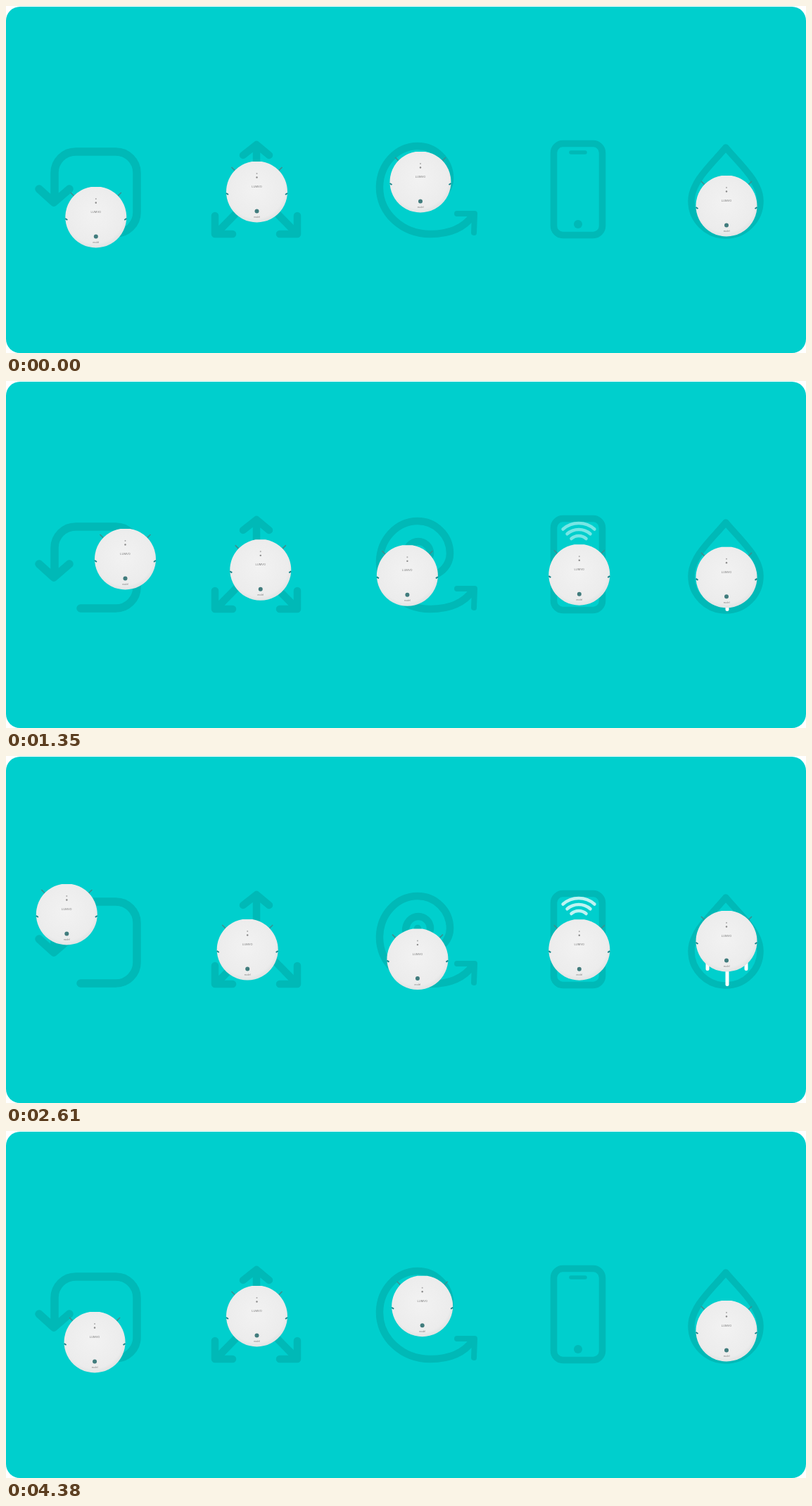
An HTML page that plays this animation: 1137x493 px, repeating every 4.41 s.

```html
<!DOCTYPE html>
<html lang="en">
<head>
<meta charset="utf-8">
<title>Robot cleaner features</title>
<style>
  html, body { margin: 0; width: 100%; height: 100%; overflow: hidden; background: #fff; }
  svg { display: block; width: 100%; height: 100%; }
  .icons { fill: none; stroke: #00b9b7; stroke-width: 10.5; stroke-linecap: round; stroke-linejoin: round; }
  .white { fill: none; stroke: #fff; stroke-linecap: round; }
  text { font-family: Inter, Arial, sans-serif; text-anchor: middle; fill: #777; }
</style>
</head>
<body>
<svg viewBox="0 0 1137 493">
  <defs>
    <radialGradient id="shell" cx=".48" cy=".45" r=".56">
      <stop offset="0" stop-color="#f2f2f2"/>
      <stop offset=".85" stop-color="#ececec"/>
      <stop offset="1" stop-color="#dfe2e2"/>
    </radialGradient>
    <g id="bot">
      <path d="M-36-35l5 5M36-35l-5 5" stroke="#3b8f91" stroke-width="1.6"/>
      <path d="M-7-43H7A43.5 43.5 0 1 1-7-43Z" fill="url(#shell)"/>
      <path d="M-43.5 2l3 2M43.5 2l-3 2" stroke="#16858a" stroke-width="2"/>
      <circle cy="-26" r="1" fill="#aaa"/>
      <circle cy="-20.5" r="1.2" fill="#888"/>
      <text y="-6" font-size="4">LUMVO</text>
      <circle cy="27.5" r="3" fill="#417c7d"/>
      <text y="37" font-size="3">model</text>
    </g>
    <path id="out" d="M589 250C616 240 610 211 576 214C556 215 550 262 570 276C584 288 612 290 638 277"/>
    <path id="back" d="M638 277C618 290 600 294 586 289C552 277 535 215 576 208.5C612 202 614 240 589 250"/>
  </defs>

  <rect y="1" width="1137" height="492" rx="20" fill="#00cfcd"/>

  <g class="icons">
    <path stroke-width="11.5" d="M106 323H156A30 30 0 0 0 186 293V237A30 30 0 0 0 156 207H99A30 30 0 0 0 69 237V277M47 260L68 279L90 260"/>
    <path d="M356 198V265L298 324M356 265L414 324M337 212L356 197L374 212M297 298V324H322M389 324H414V298"/>
    <path d="M664 297Q645 324 603 324A72 66 0 0 1 531 258A54 59 0 0 1 585 199A46 46 0 0 1 631 245A35 33 0 0 1 596 278A28 30 0 0 1 568 248A18 20 0 0 1 586 228A17 17 0 0 1 603 245A9 9 0 0 1 585 245"/>
    <path stroke-width="8" d="M641 295H666L665 322"/>
    <rect stroke-width="9.5" x="778.5" y="195.5" width="69" height="130" rx="13"/>
    <path id="slot" stroke-width="5.5" d="M803 208H823"/>
    <path stroke-width="12" d="M813 310h0"/>
    <path stroke-width="9.5" d="M1023 201C1004 224 974 249 974 277A49 49 0 0 0 1072 277C1072 249 1042 224 1023 201Z"/>
    <path stroke-width="8" d="M1002 278A22 22 0 0 0 1046 278"/>
  </g>

  <g id="wifi" class="white" stroke-width="4.5"></g>
  <path id="water" class="white" stroke-width="5"/>
  <g id="bots"></g>
</svg>

<script>
const LOOP = 4410, STEP = 30, TURN = 2035;
const $ = id => document.getElementById(id);
const mix = (a, b, u) => a + (b - a) * u;
const ramp = (t, from, to) => Math.min(1, Math.max(0, (t - from) / (to - from)));
const pulse = (t, a, b, c, d) => ramp(t, a, b) * (1 - ramp(t, c, d));

// Index of the interval holding t, and how far through it t is
function locate(times, t) {
  const i = times.findIndex((v, k) => t < times[k + 1]);
  return i < 0 ? [times.length - 2, 1] : [i, ramp(t, times[i], times[i + 1])];
}

// Out and back at an even pace within each interval: 0, 1, 0
function trip(times, t) {
  const [i, u] = locate(times, t);
  return [i, 1 - Math.abs(2 * u - 1)];
}

// Start point on the lower side, four corners, start point again
const sideTimes = [0, 720, 1725, 2640, 3660, LOOP];
const sideX = [127.8, 169.5, 169.5, 83.5, 84.2, 127.8];
const sideY = [300, 300, 225, 225, 300, 300];

function square(t) {
  const [i, u] = locate(sideTimes, t);
  return [sideX, sideY].map(v => mix(v[i], v[i + 1], u));
}

const arms = [[35, 29], [-35, 29], [0, -25]];

function fork(t) {
  const [i, u] = trip([0, 1460, 2880, LOOP], t);
  return [356.5 + arms[i][0] * u, 264 + arms[i][1] * u];
}

function spiral(t) {
  const path = $(t < TURN ? 'out' : 'back');
  const u = t < TURN ? t / TURN : ramp(t, TURN, LOOP);
  const p = path.getPointAtLength(u * path.getTotalLength());
  return [p.x, p.y];
}

function lift(t) {
  const u = trip([0, 1450, 2960, 4380], t)[1];
  return [1024, Math.min(284, 285.5 - 48.5 * u)];
}

// Each wave outward appears later and leaves earlier; all share one slow glow
function waveOpacity(t, i) {
  const glow = .75 + .28 * Math.cos((t - 2190) / 1680 * 2 * Math.PI);
  return glow * pulse(t, 330 + 170 * i, 450 + 170 * i, 3615 - 150 * i, 3735 - 150 * i);
}

$('bots').innerHTML = '<use href="#bot"/>'.repeat(5);
$('wifi').innerHTML = [16, 25, 34].map(r => {
  const x = r * .66, y = 236 - r * .75;
  return `<path d="M${814 - x} ${y}A${r} ${r} 0 0 1 ${814 + x} ${y}"/>`;
}).join('');
const bots = [...$('bots').children], arcs = [...$('wifi').children];

function draw(now) {
  const t = Math.floor(now % LOOP / STEP) * STEP;
  const spots = [square(t), fork(t), spiral(t), [814.8, 275.2], lift(t)];
  bots.forEach((bot, i) => bot.setAttribute('transform', `translate(${spots[i]})`));
  bots[3].setAttribute('opacity', pulse(t, 90, 330, 3840, 4200));
  $('slot').setAttribute('opacity', 1 - pulse(t, 200, 500, 3450, 3690));
  arcs.forEach((arc, i) => arc.setAttribute('opacity', waveOpacity(t, i)));
  const y = spots[4][1];
  $('water').setAttribute('d', `M997 ${y}V302.5M1025 ${y}V324.5M1052 ${y}V302.5`);
}

const start = performance.now();
function tick() {
  draw(performance.now() - start);
  requestAnimationFrame(tick);
}
tick();
</script>
</body>
</html>
```
